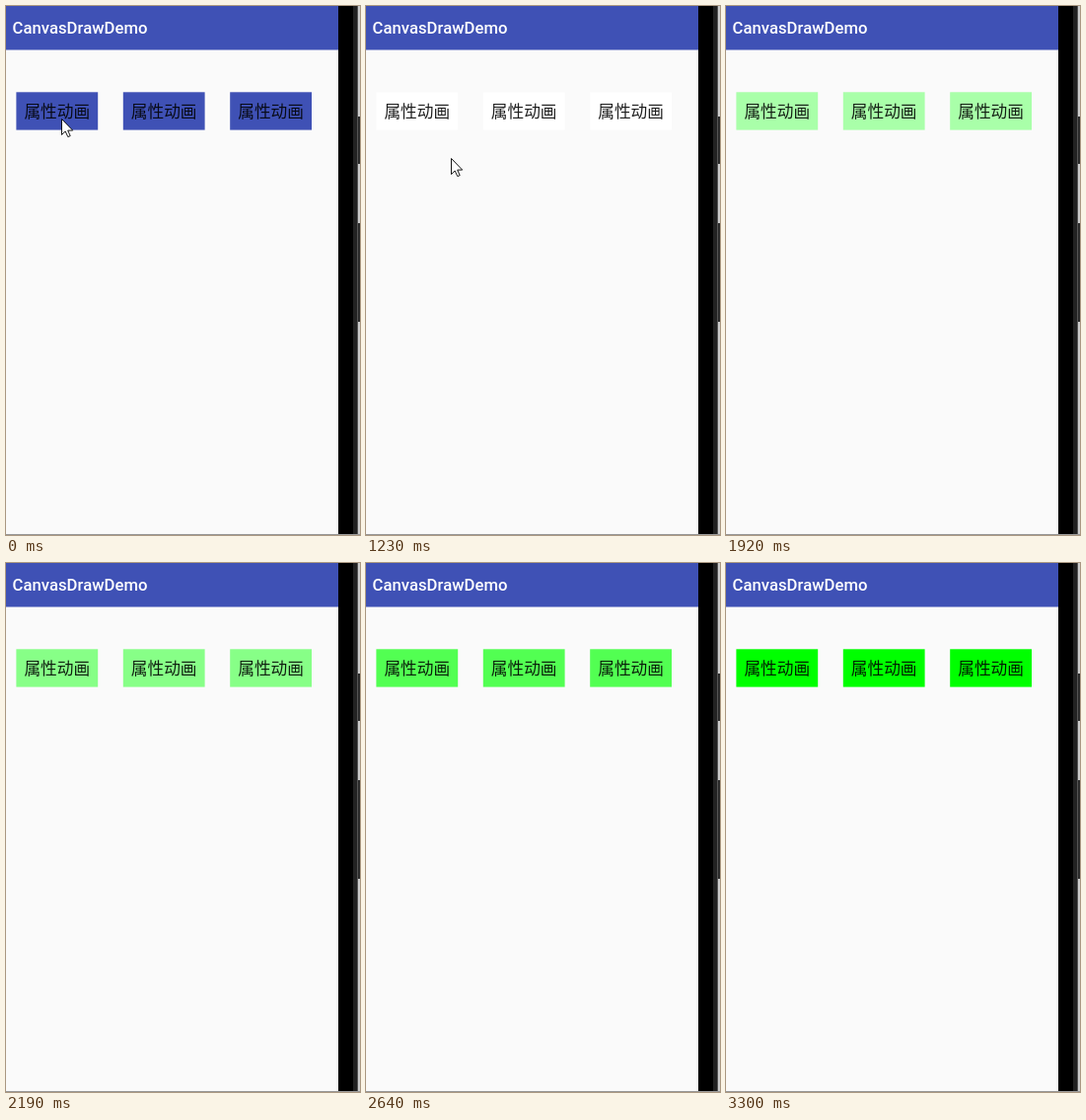
An HTML page that plays this animation: 359x536 px, repeating every 3.61 s.

```html
<!DOCTYPE html>
<html lang="zh-CN">
<head>
<meta charset="utf-8">
<style>
  html, body { margin: 0; width: 100%; height: 100%; overflow: hidden; background: #fafafa; }
  svg { display: block; }
  .title { font: 500 16.7px Roboto, sans-serif; fill: #fff; }
  .label { font: 350 16.7px "Noto Sans CJK SC", "Noto Sans CJK", sans-serif; text-anchor: middle; fill: #000; fill-opacity: .88; }
</style>
</head>
<body>
<svg width="359" height="536" viewBox="0 0 359 536">
  <rect width="359" height="536" fill="#fafafa"/>
  <rect width="337" height="44.5" fill="#3f51b5"/>
  <text class="title" x="6.6" y="28">CanvasDrawDemo</text>
  <g id="buttons"></g>

  <!-- device edge -->
  <rect y="535" width="359" height="1" fill="#999"/>
  <rect x="337" width="15" height="535" fill="#000"/>
  <rect x="352" width="4" height="535" fill="#222"/>
  <rect x="356" width="1" height="535" fill="#555"/>
  <rect x="357" width="2" height="535" fill="#ccc"/>
  <path d="M357 112h2v48h-2zM357 220h2v100h-2z" fill="#2b2b2b"/>

  <path id="cursor" d="M.5.5v16l3.7-3.5 2.6 5.6 2.4-1-2.5-5.5h5z" fill="#fff" stroke="#000" stroke-width=".9"/>
</svg>
<script>
const LOOP = 3610, TICK = 135, PHASE = 15;
const PRESSED = 710, POINTER_GONE = 1905;

const buttons = document.getElementById('buttons');
const cursor = document.getElementById('cursor');

for (let i = 0; i < 3; i++) {
  const x = 10.4 + 108.4 * i;
  buttons.innerHTML += `<rect x="${x}" y="87.3" width="82.8" height="38.3"/>
    <text class="label" x="${x + 41.4}" y="112.7">属性动画</text>`;
}

const progress = (t, start, length) => Math.min(1, Math.max(0, (t - start) / length));
const easeInOut = u => u < .5 ? 4 * u ** 3 : 1 - 4 * (1 - u) ** 3;

// white fades evenly to pure green
function buttonColor(t) {
  const v = Math.round(255 * (1 - progress(t, 1240, 1980)));
  return `rgb(${v},255,${v})`;
}

// slightly bowed sweep to the lower right
function pointerAt(t) {
  const e = easeInOut(progress(t, 1063, 572));
  return [56 + 255 * e + 50 * e * (1 - e), 114 + 398 * e].map(Math.round);
}

function draw(now) {
  const t = now % LOOP;
  const tick = PHASE + Math.floor((t - PHASE) / TICK) * TICK;
  buttons.setAttribute('fill', t < PRESSED ? '#3f51b5' : buttonColor(tick));
  cursor.setAttribute('visibility', t < POINTER_GONE ? 'visible' : 'hidden');
  cursor.setAttribute('transform', `translate(${pointerAt(tick)})`);
  requestAnimationFrame(draw);
}
draw(0);
</script>
</body>
</html>
```
